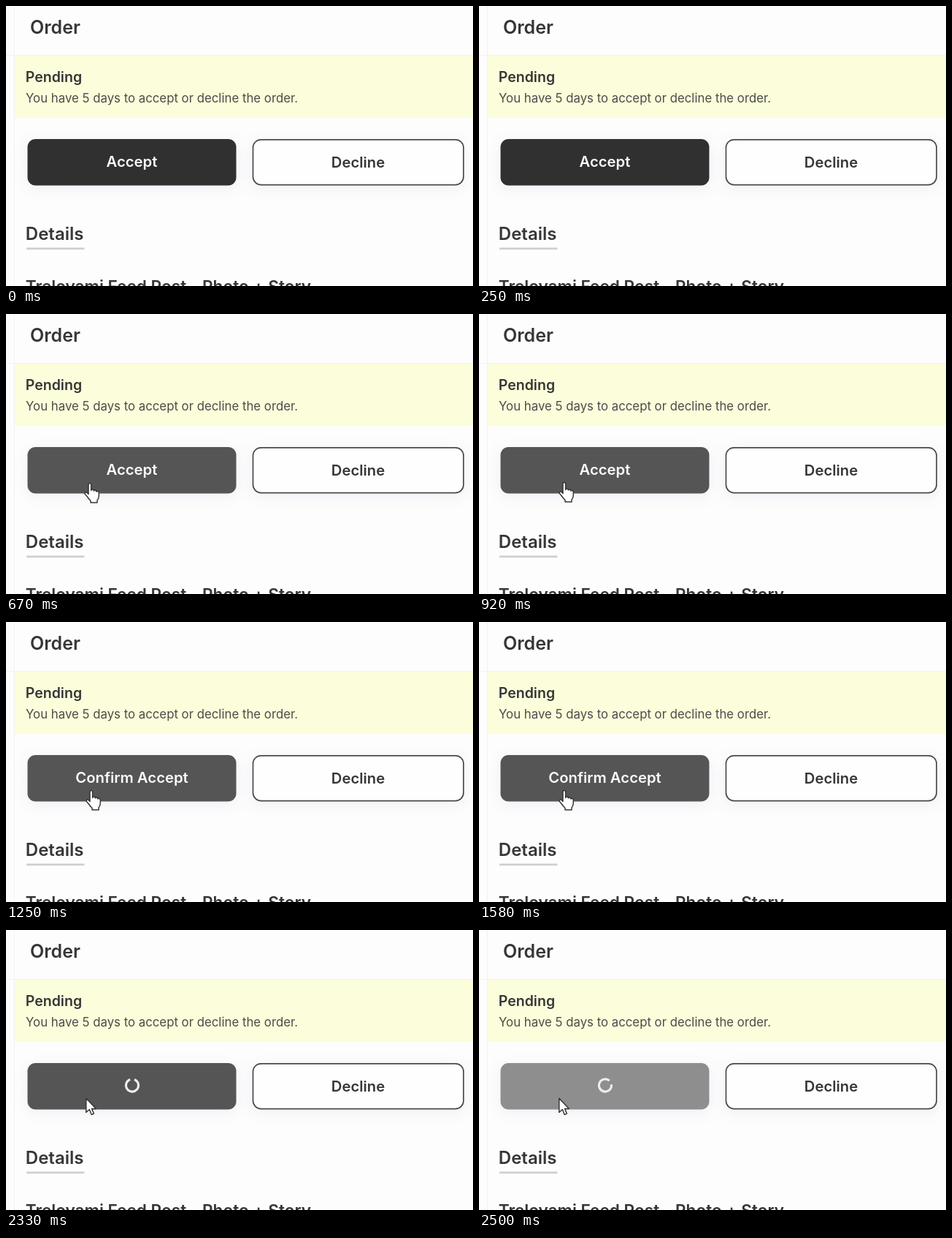
Recreate the animation shown at these times as an HTML page. Size 640x383 px, loop 2580 ms.

```html
<!DOCTYPE html>
<html lang="en">
<head>
<meta charset="utf-8">
<title>Order</title>
<style>
  html, body { margin: 0; height: 100%; overflow: hidden; background: #fdfdfd; }
  svg { display: block; width: 640px; height: 383px; font: 600 20.3px Inter, sans-serif; fill: #363636; }
  .middle { text-anchor: middle; }
  .raised { filter: drop-shadow(0 4px 10px rgba(60, 50, 150, .07)); }
  .cursor { fill: #fff; stroke: #363636; stroke-width: 1.5; stroke-linejoin: round; }
</style>
</head>
<body>
<svg viewBox="0 0 640 383">
  <rect x="12" y="68" width="628" height="85" fill="#fcfdda"/>
  <path d="M0 67.5H640M11.5 0V383" stroke="#f2f2f4"/>

  <text x="33" y="38" font-size="25">Order</text>
  <text x="26.8" y="103.5" font-size="19.5">Pending</text>
  <text x="27" y="132.4" font-size="16.8" font-weight="400" fill="#4c4c4a">You have 5 days to accept or decline the order.</text>

  <g class="raised">
    <rect id="button" x="29.500" y="182" width="286" height="63.500" rx="11"/>
    <rect x="338.500" y="182.800" width="288.500" height="61.800" rx="11" fill="#fefefe" stroke="#4a4a4a" stroke-width="1.700"/>
  </g>
  <text id="label" class="middle" x="172.500" y="220" fill="#fafafa"></text>
  <circle id="spinner" cx="173" cy="212.500" r="8.600" fill="none" stroke="#ededf0" stroke-width="3.200" pathLength="360" stroke-dasharray="320 40"/>
  <text class="middle" x="482.500" y="221">Decline</text>

  <text x="26.800" y="319.500" font-size="24">Details</text>
  <path d="M28 331.800H107.500" stroke="#cfcfd2" stroke-width="2.800"/>
  <text x="26.800" y="392" font-size="22.600">Trelovami Feed Post - Photo + Story</text>

  <g id="cursor" class="cursor">
    <path id="arrow" d="M.8 .8V20L5.3 16 8.2 23 11.4 21.6 8.5 15H14.3Z"/>
    <path id="hand" d="M6 16V3Q6 1 7.8 1T9.6 3V11Q9.8 9.4 11.6 9.6T13.3 11.5Q13.8 10.2 15.3 10.5T16.8 12.5Q17.6 11.5 18.9 12T20.3 14V18Q20.3 22 18 24.5V27.5H9V25Q6 22 3.6 18.5L1.4 16Q.6 14.5 2 13.6T6 16Z"/>
  </g>
</svg>
<script>
  const LOOP = 2580, HOVER = 480, CONFIRM = 1250, LOADING = 1915;
  const el = id => document.getElementById(id);
  const [button, label, spinner, cursor, arrow, hand] =
    ['button', 'label', 'spinner', 'cursor', 'arrow', 'hand'].map(el);

  // Each key is [time, values...]; values are held outside the keyed range.
  const cursorKeys = [[250, -20, 300], [500, 85, 235.5], [670, 107, 230.5], [920, 109, 229.5]];
  const grayKeys = [[510, 48], [660, 85], [2380, 85], [2500, 142]];

  function at(keys, t) {
    const next = keys.findIndex(key => key[0] > t);
    if (next < 1) return keys.at(next).slice(1);
    const a = keys[next - 1], b = keys[next];
    const p = (t - a[0]) / (b[0] - a[0]);
    return a.slice(1).map((v, i) => v + (b[i + 1] - v) * p);
  }

  const show = (node, visible) => node.style.display = visible ? '' : 'none';

  function draw(now) {
    const t = now % LOOP;
    const loading = t >= LOADING;
    const pointing = t >= HOVER && !loading;
    const [gray] = at(grayKeys, t);
    button.style.fill = `rgb(${gray}, ${gray}, ${gray})`;
    label.textContent = t < CONFIRM ? 'Accept' : 'Confirm Accept';
    show(label, !loading);
    show(spinner, loading);
    spinner.setAttribute('transform', `rotate(${(t - 2330) * 0.36 - 70} 173 212.5)`);
    cursor.setAttribute('transform', `translate(${at(cursorKeys, t)})`);
    show(arrow, !pointing);
    show(hand, pointing);
    requestAnimationFrame(() => draw(performance.now() - start));
  }

  const start = performance.now();
  draw(0);
</script>
</body>
</html>
```
